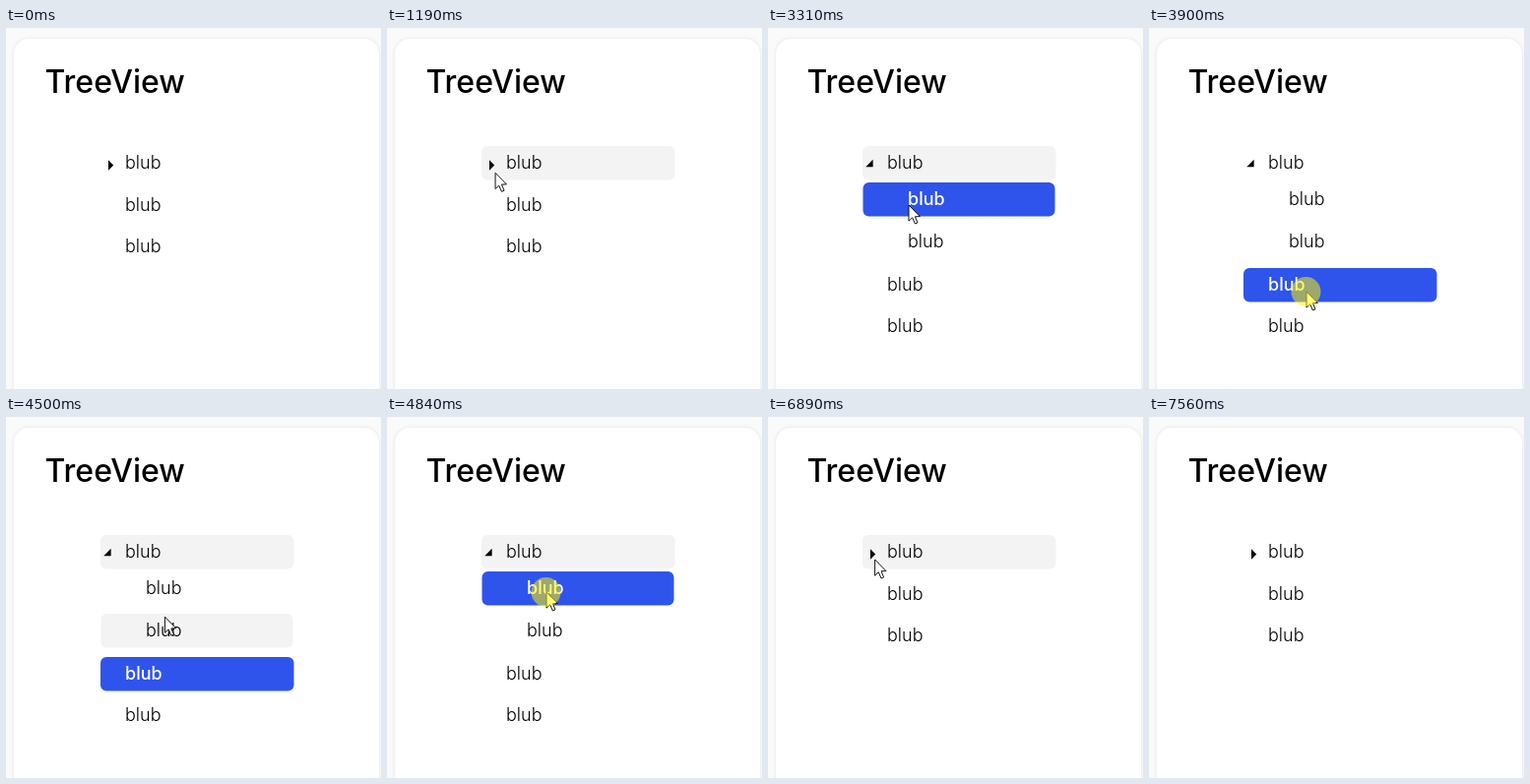
Write an HTML page with a canvas that moves like this. It is 381 by 367 pixels and loops after 8.5 s.

```html
<!DOCTYPE html>
<html lang="en">
<head>
<meta charset="utf-8">
<title>TreeView</title>
<style>
html, body { margin: 0; width: 100%; height: 100%; overflow: hidden; background: #fafafa; }
canvas { display: block; }
</style>
</head>
<body>
<canvas id="stage" width="381" height="367"></canvas>
<script>
const ctx = document.getElementById('stage').getContext('2d');
const LOOP = 8500;
const FONT = 'Inter, "Liberation Sans", sans-serif';
const BLUE = '#2f54eb', HOVER = '#f3f3f3';
const OPEN = 2170, CLOSE = 5840, TURN = 120;
const SHOW = 520, HIDE = 7555;

// pointer stops: time, x, y
const path = [
  [520, 298, 352], [1320, 96, 132], [1590, 96, 132], [1850, 105, 138],
  [2610, 105, 138], [2770, 136, 165], [3245, 136, 165], [3310, 143, 180],
  [3570, 160, 268], [4110, 160, 268], [4710, 162, 178], [4900, 162, 178],
  [5100, 121, 155], [5180, 121, 155], [5570, 105, 141], [6830, 105, 141],
  [7560, 288, 342]
];
// clicks: start, end
const clicks = [[2040, 2170], [2970, 3110], [3840, 3970], [4770, 4910], [5770, 5900]];

const clamp = v => Math.min(1, Math.max(0, v));
const mix = (a, b, k) => a + (b - a) * k;
const ease = k => k * k * (3 - 2 * k);

function pointerAt(t) {
  let i = 1;
  while (i < path.length - 1 && t > path[i][0]) i++;
  const [t0, x0, y0] = path[i - 1], [t1, x1, y1] = path[i];
  const k = ease(clamp((t - t0) / (t1 - t0)));
  return { x: mix(x0, x1, k), y: mix(y0, y1, k) };
}

function selectedAt(t) {
  if (t < 2970 || t >= CLOSE) return '';
  return t >= 3840 && t < 4770 ? 'second' : 'child';
}

function box(x, y, w, h, r, color) {
  ctx.fillStyle = color;
  ctx.beginPath();
  ctx.roundRect(x, y, w, h, r);
  ctx.fill();
}

function shape(points, fill, stroke) {
  ctx.beginPath();
  points.forEach(([x, y]) => ctx.lineTo(x, y));
  ctx.closePath();
  ctx.fillStyle = fill;
  ctx.fill();
  if (stroke) {
    ctx.strokeStyle = stroke;
    ctx.lineWidth = 1;
    ctx.stroke();
  }
}

function label(text, x, y, size, weight, color) {
  ctx.font = `${weight} ${size}px ${FONT}`;
  ctx.fillStyle = color;
  ctx.fillText(text, x, y);
}

function card() {
  ctx.fillStyle = '#fafafa';
  ctx.fillRect(0, 0, 381, 367);
  ctx.save();
  ctx.shadowColor = 'rgba(0,0,0,.09)';
  ctx.shadowBlur = 4;
  box(8, 11, 371, 400, 15, '#fff');
  ctx.restore();
  label('TreeView', 39.5, 66, 32, 500, '#000');
}

function row(y, nested, selected, hovered) {
  const x = nested ? 96.5 : 96, w = nested ? 195 : 196.5;
  if (selected || hovered) box(x, y, w, 34.5, 6, selected ? BLUE : HOVER);
  label('blub', nested ? 142 : 121, y + 23, 18, selected ? 500 : 300, selected ? '#fff' : '#000');
}

function marker(k) {
  ctx.save();
  ctx.translate(mix(105.8, 104.2, k), mix(139.5, 138.8, k));
  ctx.rotate(k * Math.PI / 4);
  shape([[-1.8, -5.2], [3.4, 0], [-1.8, 5.2]], '#000');
  ctx.restore();
}

function pointer(p) {
  ctx.save();
  ctx.translate(p.x, p.y);
  shape([[0, 0], [0, 16.2], [3.7, 12.8], [6.4, 19], [9, 17.9], [6.4, 11.8], [11.4, 11.6]], '#fff', '#111');
  ctx.restore();
}

function draw(t) {
  const open = t >= OPEN && t < CLOSE;
  const shown = t >= SHOW && t < HIDE;
  const p = pointerAt(t);
  const pick = selectedAt(t);
  const over = (y, h = 34.5) => shown && p.x >= 95 && p.x <= 293 && p.y >= y && p.y < y + h;
  const [second, third] = open ? [244, 286] : [163, 205];

  card();
  row(120, false, false, over(120, open ? 117 : 34.5));
  if (open) {
    row(157, true, pick === 'child', over(157));
    row(200, true, false, over(200));
  }
  row(second, false, pick === 'second', over(second));
  row(third, false, false, over(third));
  marker(t < CLOSE ? clamp((t - OPEN) / TURN) : 1 - clamp((t - CLOSE) / TURN * 2));

  if (shown) pointer(p);
  if (clicks.some(([a, b]) => t >= a && t < b)) {
    ctx.fillStyle = 'rgba(255,246,0,.53)';
    ctx.beginPath();
    ctx.arc(p.x - 0.5, p.y, 15, 0, Math.PI * 2);
    ctx.fill();
  }
}

function tick() {
  draw(performance.now() % LOOP);
  requestAnimationFrame(tick);
}
tick();
</script>
</body>
</html>
```
